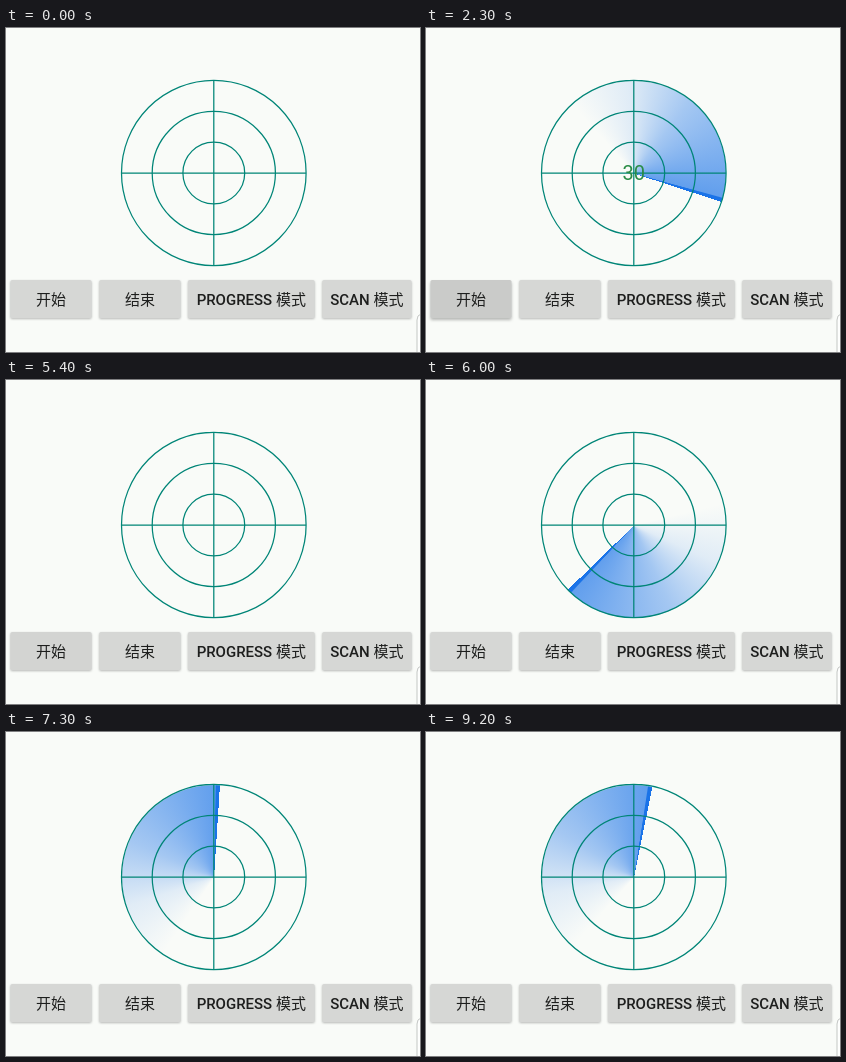
Write an HTML page that moves like this. It is 414 by 324 pixels and loops after 9300 ms.

```html
<!DOCTYPE html>
<html lang="zh">
<head>
<meta charset="utf-8">
<title>Radar</title>
<style>
  html, body { margin: 0; width: 100%; height: 100%; overflow: hidden; background: #f9fbf8; }
  #sweep { position: absolute; left: 115.5px; top: 52.5px; width: 184.6px; height: 185px; border-radius: 50%; }
  svg { position: absolute; left: 0; top: 0; }
  .grid { fill: none; stroke: #008577; stroke-width: 1.25; }
  text { text-anchor: middle; }
  .label { font: 500 15px Roboto, "Noto Sans CJK SC", "Noto Sans CJK", sans-serif; fill: #1d1e1d; }
  .label .zh { font-weight: 400; }
  #percent { font: 400 20px Roboto, sans-serif; fill: #2a8c46; }
</style>
</head>
<body>
<div id="sweep"></div>
<svg width="414" height="324" viewBox="0 0 414 324">
  <g class="grid">
    <ellipse cx="207.8" cy="145" rx="92.3" ry="92.7"/>
    <circle cx="207.8" cy="145" r="61.6"/>
    <circle cx="207.8" cy="145" r="30.9"/>
    <path d="M115.5 145H300M207.8 52.3V237.7"/>
  </g>
  <text id="percent" x="207.8" y="152.2"></text>
  <g id="buttons"></g>
  <path d="M415 286Q411 287 411 292V325H415Z" fill="#fdfefd" stroke="#c3c6c4"/>
</svg>
<script>
const LOOP = 9300, STEP = 100;
const SPEED = 0.383; // degrees per ms
const NS = 'http://www.w3.org/2000/svg';
const sweep = document.getElementById('sweep');
const percent = document.getElementById('percent');

// presses: [touch down, release]
const buttons = [
  { x: 4.5, w: 81, latin: '', zh: '开始', presses: [[1900, 2400], [5400, 5900]] },
  { x: 93.3, w: 81.2, latin: '', zh: '结束', presses: [[3500, 3700]] },
  { x: 182, w: 126.6, latin: 'PROGRESS ', zh: '模式', presses: [[1300, 1600]] },
  { x: 316.3, w: 89.2, latin: 'SCAN ', zh: '模式', presses: [[4600, 4800]] }
];

function add(parent, tag, attrs, content = '') {
  const el = document.createElementNS(NS, tag);
  for (const key in attrs) el.setAttribute(key, attrs[key]);
  el.textContent = content;
  return parent.appendChild(el);
}

const group = document.getElementById('buttons');
for (const b of buttons) {
  b.rect = add(group, 'rect', { x: b.x, y: 252, width: b.w, height: 38, rx: 1.6 });
  const label = add(group, 'text', { class: 'label', x: b.x + b.w / 2, y: 276.6 }, b.latin);
  add(label, 'tspan', { class: 'zh' }, b.zh);
}

const clamp = v => Math.max(0, Math.min(1, v));

function pressure(t, presses) {
  return Math.max(...presses.map(([down, up]) =>
    Math.min(clamp((t - down + 30) / 130), clamp((up + STEP - t) / 200))));
}

function drawButton(b, t) {
  const p = pressure(t, b.presses);
  const shade = [214, 215, 213].map(c => Math.round(c - 12 * p));
  b.rect.style.fill = `rgb(${shade})`;
  b.rect.style.filter = `drop-shadow(0 ${1 + p}px ${1 + 0.4 * p}px rgba(0,0,0,.27))`;
}

function drawSweep(angle) {
  const blue = a => `rgba(26,115,232,${a})`;
  sweep.style.background = angle === null ? 'none' :
    `conic-gradient(from ${angle}deg, transparent 0 210deg, ${blue(0.11)} 248deg, ` +
    `${blue(0.38)} 290deg, ${blue(0.68)} 357deg, ${blue(1)} 357.7deg 360deg)`;
}

function draw(time) {
  const t = Math.floor(time % LOOP / STEP) * STEP;
  let angle = null, done = '';
  if (t >= 2100 && t < 3600) {
    angle = Math.min(360, 108 + (t - 2300) * SPEED);
    done = Math.round(angle / 3.6);
  } else if (t >= 5500) {
    angle = (95.6 + (t - 6600) * SPEED + 720) % 360;
  }
  drawSweep(angle);
  percent.textContent = done;
  buttons.forEach(b => drawButton(b, t));
}

const start = performance.now();
function tick() {
  draw(performance.now() - start);
  requestAnimationFrame(tick);
}
tick();
</script>
</body>
</html>
```
